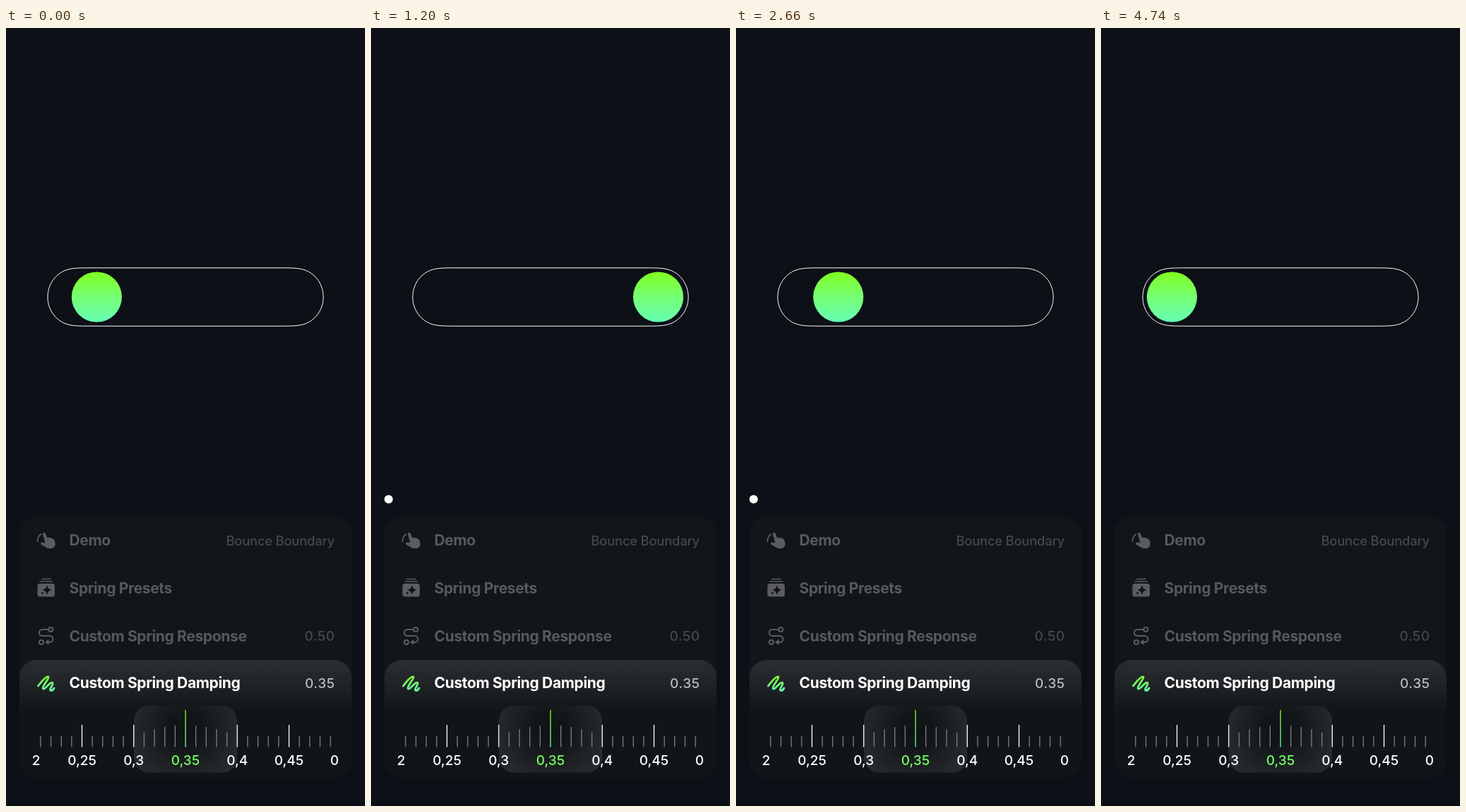
Write an HTML page that moves like this. It is 508 px wide and 1102 px high and loops after 4990 ms.

```html
<!DOCTYPE html>
<html lang="en">
<head>
<meta charset="utf-8">
<title>Bounce Boundary</title>
<style>
  html, body { margin: 0; width: 100%; height: 100%; overflow: hidden; background: #0d1117; }
  svg { display: block; width: 100vw; height: 100vh; }
  text { font-family: Inter, sans-serif; font-size: 19px; font-weight: 450; }
  .title { font-size: 21px; font-weight: 700; letter-spacing: -.35px; fill: #57595c; }
  .value { text-anchor: end; fill: #45484b; letter-spacing: .5px; }
  .name { font-size: 18.3px; letter-spacing: -.15px; }
  .label { text-anchor: middle; fill: #fff; }
  .on { fill: #fff; }
  .icon { fill: none; stroke: #5b5d60; stroke-width: 2; stroke-linecap: round; stroke-linejoin: round; }
  .solid { fill: #5b5d60; stroke: none; }
  .dark { fill: #121519; stroke: none; }
</style>
</head>
<body>
<svg viewBox="0 0 508 1102">
  <defs>
    <linearGradient id="green" x1="0" y1="0" x2="0" y2="1">
      <stop stop-color="#7fff1e"/><stop offset=".5" stop-color="#75ff74"/><stop offset="1" stop-color="#66ffb5"/>
    </linearGradient>
    <linearGradient id="lime" gradientUnits="userSpaceOnUse" x1="0" y1="916" x2="0" y2="940">
      <stop stop-color="#7fff1e"/><stop offset="1" stop-color="#66ffb5"/>
    </linearGradient>
    <linearGradient id="sheet" x1="0" y1="0" x2="0" y2="1">
      <stop stop-color="#2b2e31"/><stop offset=".2" stop-color="#212427"/>
      <stop offset=".44" stop-color="#121518"/><stop offset="1" stop-color="#121518"/>
    </linearGradient>
    <radialGradient id="lens" gradientUnits="userSpaceOnUse" cx="254" cy="995" r="82">
      <stop stop-color="#0f1215"/><stop offset=".3" stop-color="#131619"/><stop offset="1" stop-color="#292c2f"/>
    </radialGradient>
  </defs>

  <rect width="508" height="1102" fill="#0d1117"/>
  <rect y="1098" width="508" height="4" fill="#0a0d11"/>

  <path fill="none" stroke="#fff" d="M122 339.8H386C404 339.8 414.500 339.8 423 342.9
    C438.500 348.500 449 363.500 449 381S438.500 413.500 423 419.1C414.500 422.2 404 422.2 386 422.2
    H122C104 422.2 93.500 422.2 85 419.1C69.500 413.500 59 398.500 59 381S69.500 348.500 85 342.9C93.500 339.8 104 339.8 122 339.8Z"/>
  <circle id="ball" cy="381" r="35.6" fill="url(#green)"/>
  <circle id="dot" cx="24.9" cy="667.4" r="6" fill="#fff"/>

  <rect x="19" y="692" width="470" height="370" rx="25" fill="#121519"/>
  <rect x="19" y="895" width="470" height="167" rx="25" fill="url(#sheet)"/>
  <rect x="181" y="960" width="146" height="94.5" rx="21" fill="url(#lens)"/>

  <g class="icon">
    <path stroke-width="1.8" d="M44.5 727Q45 719.5 49.5 717"/>
    <path class="solid" d="M52.2 717Q52 714.5 54 714.5Q55.5 714.5 56.2 717L58.5 723Q60 720.5 62 722.5Q64 721 65.5 723.5
      Q68 723 69 727Q71.5 734 66 736.8Q60 738.5 55.5 735L49.5 731.5Q48.5 729 51 728.6L55.5 729.5Z"/>
  </g>
  <g class="icon">
    <path stroke-width="1.7" d="M51 780.5H63M48.5 784H65.5"/>
    <rect class="solid" x="44.5" y="787" width="24.5" height="18.5" rx="3.5"/>
    <path class="dark" d="M58 789Q59 795 65 796Q59 797 58 803Q57 797 51 796Q57 795 58 789Z"/>
    <circle class="dark" cx="51.5" cy="800.5" r="1.4"/>
  </g>
  <g class="icon">
    <circle cx="63.3" cy="852" r="3"/>
    <circle cx="50" cy="870" r="3"/>
    <path d="M59.5 852H51.5A4.5 4.5 0 0 0 51.5 861H62A4.5 4.5 0 0 1 62 870H57.5"/>
    <path class="solid" d="M55 870L60.5 866V874Z"/>
  </g>
  <path class="icon" style="stroke:url(#lime);stroke-width:2.8" d="M45.5 932C50 926 57 917.5 60 919C62 921 50 933 52.5 936
    C55 938 63 924.5 66 927.5C67.5 930 60.5 936.5 63 938.3C65 939 67 937 68 935"/>

  <text class="title" x="89.5" y="733">Demo</text>
  <text class="title" x="89.5" y="800.5">Spring Presets</text>
  <text class="title" x="89.5" y="868.5">Custom Spring Response</text>
  <text class="title on" x="89.5" y="935">Custom Spring Damping</text>
  <text class="value name" x="465" y="732.5">Bounce Boundary</text>
  <text class="value" x="465.5" y="868">0.50</text>
  <text class="value" x="465.5" y="934.5" style="fill:#b9bbbd">0.35</text>
  <g id="ruler"></g>
</svg>
<script>
  const LOOP = 4990, STEP = 20, LEFT = 100.4, RIGHT = 407.6;
  const DECAY = 4.41, FREQ = 9.95;
  const GO_RIGHT = -42, GO_LEFT = 2243;
  const ruler = document.getElementById('ruler');
  const ball = document.getElementById('ball');
  const dot = document.getElementById('dot');

  function add(tag, attrs, text = '') {
    const el = document.createElementNS('http://www.w3.org/2000/svg', tag);
    for (const name in attrs) el.setAttribute(name, attrs[name]);
    el.textContent = text;
    ruler.append(el);
  }

  for (let k = -14; k <= 14; k++) {
    const n = Math.abs(k), major = n % 5 === 0;
    const top = n === 0 ? 966 : major ? 987 : n < 5 ? 987.5 + n * n * .65 : 1003;
    const fill = n === 0 ? 'url(#green)' : major ? '#fff' : '#7d7f81';
    add('rect', { x: 254 + 14.65 * k - .65, y: top, width: 1.3, height: 1018.5 - top, fill });
  }
  ['2', '0,25', '0,3', '0,35', '0,4', '0,45', '0'].forEach((label, i) => {
    const x = i === 0 ? 42.5 : i === 6 ? 465 : 254 + 73.25 * (i - 3);
    add('text', { class: 'label', x, y: 1044, style: i === 3 ? 'fill:#74ff63' : '' }, label);
  });

  // Remaining distance of a damped spring, folded back at the wall.
  function remaining(ms) {
    const t = Math.max(0, ms) / 1000, phase = FREQ * t;
    return Math.abs(Math.exp(-DECAY * t) * (Math.cos(phase) + DECAY / FREQ * Math.sin(phase)));
  }

  // The picture advances in steps of 20 ms, with a little tolerance for timer jitter.
  function draw(now) {
    const t = Math.floor((now % LOOP) / STEP + .2) * STEP, span = RIGHT - LEFT;
    const x = t < GO_LEFT ? RIGHT - span * remaining(t - GO_RIGHT) : LEFT + span * remaining(t - GO_LEFT);
    ball.setAttribute('cx', x);
    const hidden = t < 40 || (t >= 2220 && t < 2300) || t >= 4740;
    dot.style.visibility = hidden ? 'hidden' : 'visible';
  }

  const start = performance.now();
  function tick() {
    draw(performance.now() - start);
    requestAnimationFrame(tick);
  }
  draw(0);
  requestAnimationFrame(tick);
</script>
</body>
</html>
```
